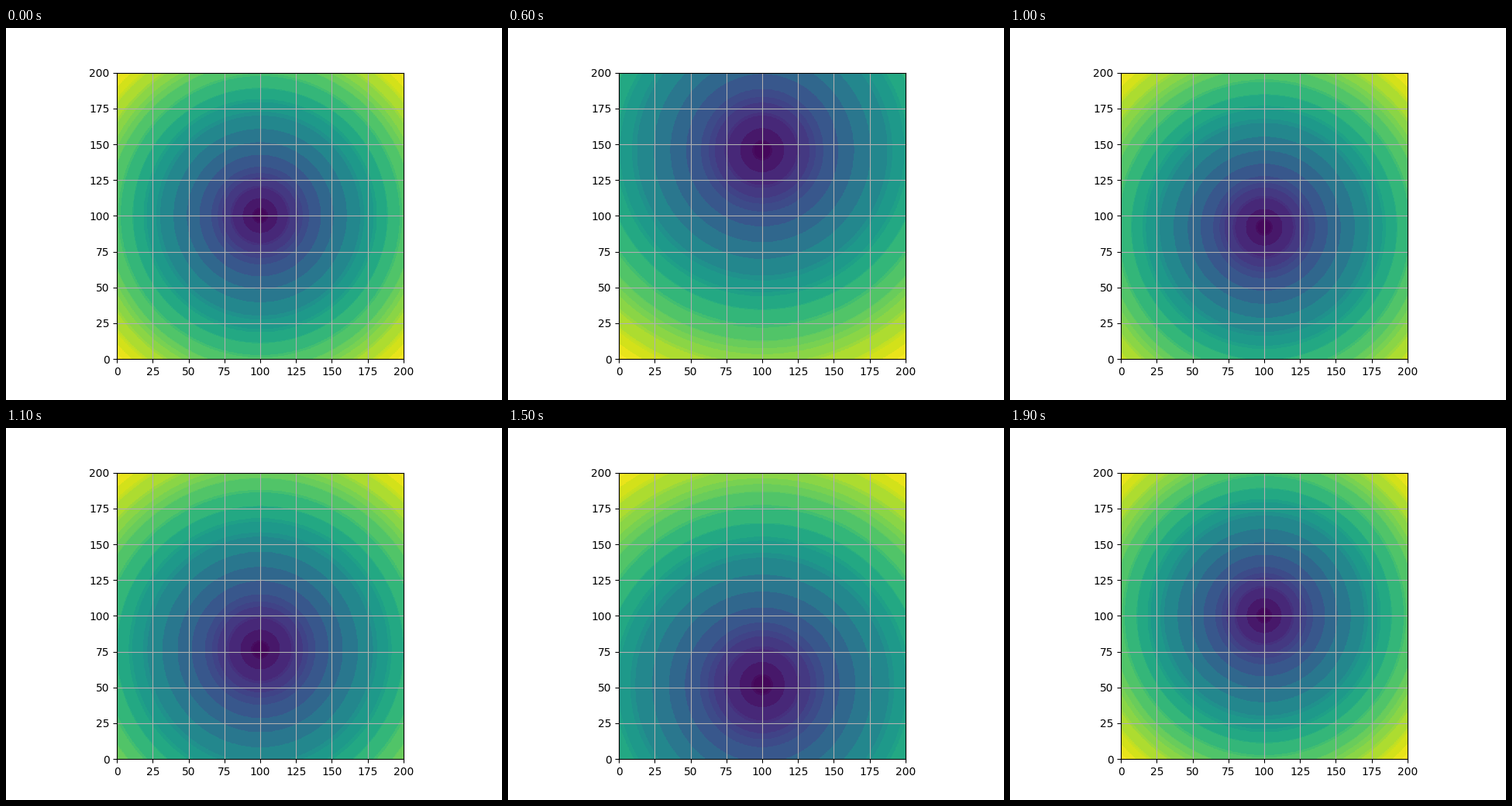
A matplotlib script for the animation above (2000 ms loop, 640 px wide and 480 px high).

```python
import numpy as np
import matplotlib.pyplot as plt
from matplotlib.animation import FuncAnimation
from matplotlib.colors import ListedColormap

FRAMES = 20
SIZE = 200
VIRIDIS = np.rint(plt.get_cmap("viridis")(np.arange(256))[:, :3] * 255).astype(int)

# Each colour falls in a coarse RGB cell (3, 4 and 3 bits)
red, green, blue = VIRIDIS.T
_, CELL = np.unique((red >> 5) * 128 + (green >> 4) * 8 + (blue >> 5),
                    return_inverse=True)

axis = np.linspace(0, SIZE, 201)
X, Y = np.meshgrid(axis, axis)


def distance(step):
    """Distance to a centre that swings up and down on a sine."""
    cy = 100 + 50 * np.sin(2 * np.pi * step / (FRAMES - 1))
    return np.hypot(X - 100, Y - cy)


def banded_cmap(dist):
    """Viridis flattened to the mean colour of each cell, weighted by area."""
    span = (dist - dist.min()) / np.ptp(dist)
    index = np.minimum((span * 256).astype(int), 255)
    area = np.bincount(index.ravel(), minlength=256) + 1e-6
    total = np.bincount(CELL, area)
    means = [np.bincount(CELL, area * channel) / total for channel in VIRIDIS.T]
    return ListedColormap(np.stack(means, axis=1)[CELL] / 255)


fig, ax = plt.subplots(figsize=(6.4, 4.8), dpi=100)
image = ax.imshow(distance(0), origin="lower", extent=(0, SIZE, 0, SIZE))
ticks = np.arange(0, SIZE + 1, 25)
ax.set_xticks(ticks)
ax.set_yticks(ticks)
ax.grid(True)


def update(step):
    dist = distance(step)
    image.set_data(dist)
    image.set_clim(dist.min(), dist.max())
    image.set_cmap(banded_cmap(dist))
    return [image]


anim = FuncAnimation(fig, update, frames=FRAMES, interval=100,
                     init_func=lambda: update(0), repeat=True, repeat_delay=0)
plt.show()
```
